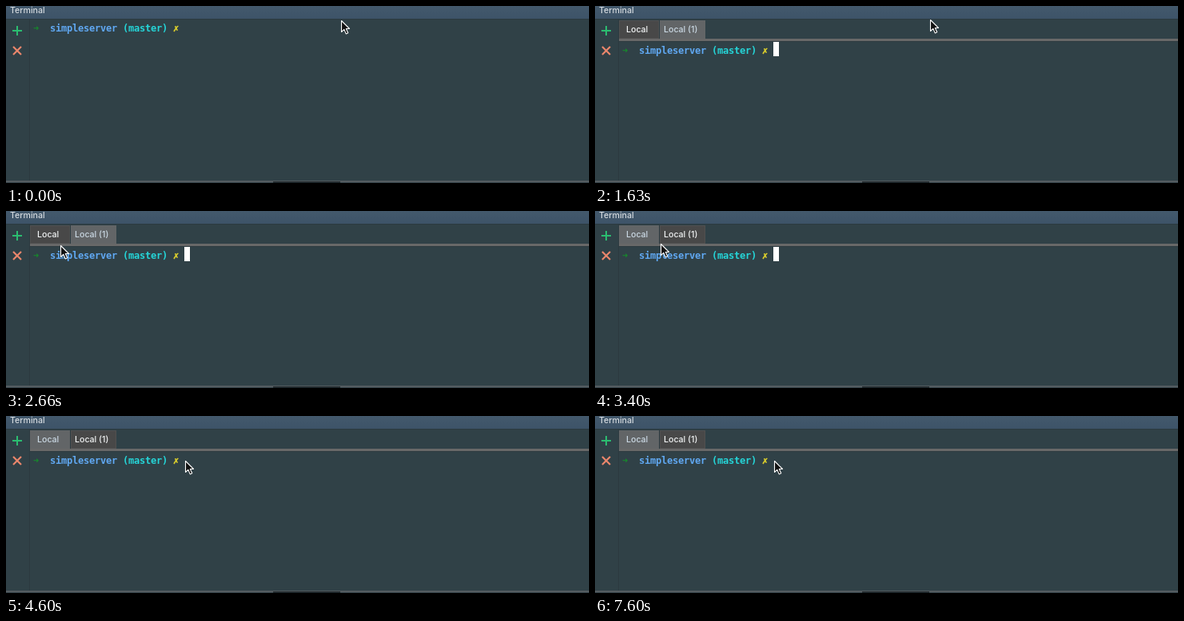
Animation of 729 by 222 pixels, one loop 8000 ms. Source, as an HTML page:

```html
<!DOCTYPE html>
<html lang="en">
<head>
<meta charset="utf-8">
<title>Terminal tabs</title>
<style>
  html, body { margin: 0; width: 100%; height: 100%; overflow: hidden; background: #304147; }
  svg { display: block; }
  .ui { font: 500 10.6px Inter, "Open Sans", sans-serif; fill: #d3d9de; }
  .mono { font: bold 12px "DejaVu Sans Mono", monospace; letter-spacing: -.224px; }
  .tab rect { fill: #484848; stroke: #505050; }
  .tab text { fill: #f2f4f5; }
  .tab.active rect { fill: #626567; stroke: #626567; }
  .tab.active text { fill: #cbd9e4; }
</style>
</head>
<body>
<svg width="729" height="222" viewBox="0 0 729 222">
  <defs>
    <linearGradient id="bar" x2="0" y2="1">
      <stop stop-color="#43596c"/>
      <stop offset="1" stop-color="#3d5368"/>
    </linearGradient>
  </defs>
  <rect width="729" height="222" fill="#304147"/>
  <rect width="729" height="16" fill="url(#bar)"/>
  <path d="M0 16.5H729M29.5 17V219" stroke="#2c3a40"/>
  <text class="ui" x="5" y="9">Terminal</text>

  <path d="M8 31H20M14 25V37" stroke="#2bbd70" stroke-width="2"/>
  <path d="M9 51L19 61M19 51L9 61" stroke="#ea866c" stroke-width="2.2"/>

  <g id="tabs">
    <g class="tab"><rect x="30.5" y="18.5" width="49" height="22"/><text class="ui" x="39" y="33">Local</text></g>
    <g class="tab"><rect x="81.5" y="18.5" width="56" height="22"/><text class="ui" x="86" y="33">Local (1)</text></g>
    <path d="M80.5 18V41M30 44.5H729" stroke="#2c3a40"/>
    <rect x="30" y="41" width="699" height="3" fill="#686868"/>
  </g>

  <g id="row" class="mono">
    <text x="34" y="15" fill="#16892b">➜</text>
    <text x="55" y="15" fill="#60a8f2">simpleserver</text>
    <text x="146" y="15" fill="#25d5d8">(master)</text>
    <text x="209" y="15" fill="#e2d42c" stroke="#e2d42c" stroke-width=".4">✗</text>
    <rect id="caret" width="7" height="18" fill="#fff"/>
  </g>

  <rect y="219" width="729" height="2" fill="#555d61"/>
  <rect y="221" width="729" height="1" fill="#364349"/>
  <rect x="334" y="220" width="84" height="2" fill="#20282c"/>

  <path id="mouse" d="M.5 .5V14.5L3.8 11.4L6.2 16.9L8.7 15.8L6.3 10.5H10.5Z"
        fill="#111" stroke="#fff" stroke-width="1.1" stroke-linejoin="round"/>
</svg>
<script>
const LOOP = 8000, OPEN = 1620, SWITCH = 2950, TYPE = 5800, ERASE = 6700;
const el = id => document.getElementById(id);
const tabs = document.querySelectorAll('.tab');
const show = (node, on) => node.style.display = on ? '' : 'none';
const place = (node, x, y) => node.setAttribute('transform', `translate(${x} ${y})`);
const latest = (list, t) => list.findLast(item => item.from <= t) || list[0];

// Blinking restarts whenever the prompt changes; phase is when the caret turns on.
const blinks = [
  { from: 0, phase: 290, half: 500 },
  { from: OPEN, phase: OPEN, half: 500 },
  { from: SWITCH, phase: 2100, half: 500 },
  { from: TYPE, phase: TYPE, half: 900 },
  { from: ERASE, phase: ERASE, half: 900 }
];

// Pointer strokes as cubic curves
const strokes = [
  { from: 1180, to: 1327, x: [419, 419, 419, 419], y: [18, 18, 17, 17] },
  { from: 1917, to: SWITCH, x: [382, 150, 33, 51], y: [23, 75, 43, 29] },
  { from: 3400, to: 4150, x: [82, 130, 224, 224], y: [41, 70, 75, 56] }
];

function bezier([a, b, c, d], u) {
  const v = 1 - u;
  return Math.round(v * v * v * a + 3 * v * v * u * b + 3 * v * u * u * c + u * u * u * d);
}

// The screen refreshes in even steps, slightly faster before the tab switch.
function snap(t) {
  const step = t < SWITCH ? 147.5 : 150;
  return SWITCH + Math.floor((t - SWITCH) / step) * step;
}

function draw(t) {
  const open = t >= OPEN, second = t < SWITCH;
  show(el('tabs'), open);
  tabs[0].classList.toggle('active', !second);
  tabs[1].classList.toggle('active', second);
  place(el('row'), 0, open ? 45 : 17);

  const { phase, half } = latest(blinks, t);
  show(el('caret'), Math.floor((t - phase) / half) % 2 === 0);
  place(el('caret'), t >= TYPE && t < ERASE ? 230 : 223, 0);

  const { from, to, x, y } = latest(strokes, t);
  const u = Math.min(1, Math.max(0, (t - from) / (to - from)));
  place(el('mouse'), bezier(x, u), bezier(y, u));
}

const start = performance.now();
function tick() {
  draw(snap((performance.now() - start) % LOOP));
  requestAnimationFrame(tick);
}
tick();
</script>
</body>
</html>
```
